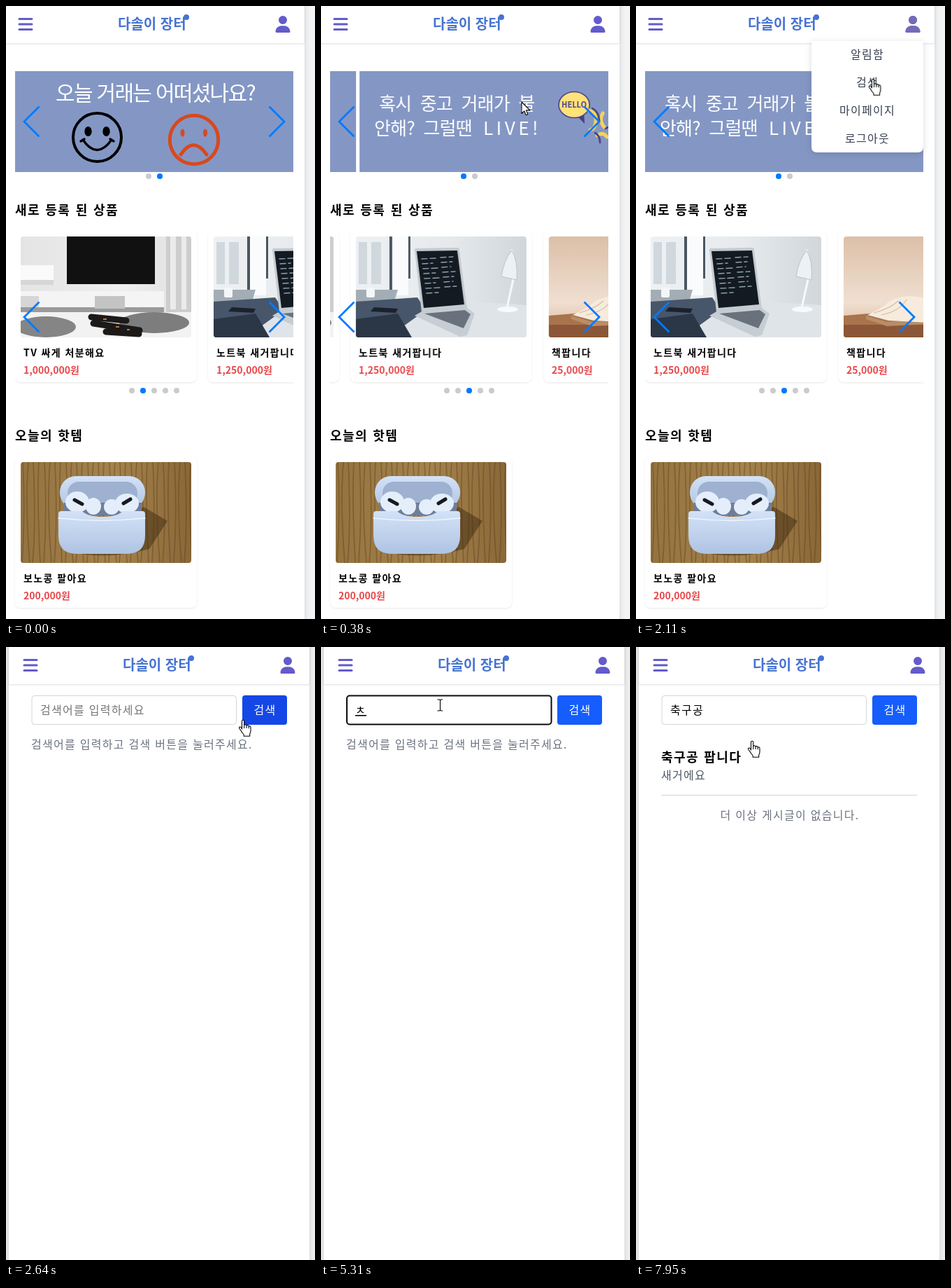
An HTML page for the animation above (8000 ms loop, 442 px wide and 875 px high).

```html
<!DOCTYPE html>
<html lang="ko">
<head>
<meta charset="utf-8">
<title>중고 장터</title>
<style>
html, body { margin: 0; height: 100%; overflow: hidden; background: #f2f3f5; }
body > svg { display: block; width: 100%; height: 100%; }
text { font: 400 16px "Noto Sans CJK KR", "Noto Sans CJK", "Noto Sans", sans-serif; letter-spacing: 1.28px; white-space: pre; }
.h { font-size: 18px; font-weight: 700; letter-spacing: 1.4px; word-spacing: 1px; }
.title { font-size: 14px; font-weight: 700; letter-spacing: 1.4px; }
.price { font-size: 14px; font-weight: 700; letter-spacing: 0; fill: #e8474a; }
.name { font-size: 20px; font-weight: 900; letter-spacing: 0; fill: #4673d2; }
.ask { font-size: 30px; letter-spacing: -1.7px; fill: #fff; }
.hand { font-size: 26px; font-weight: 500; letter-spacing: -.8px; word-spacing: 6px; fill: #fff; }
.mid { text-anchor: middle; }
.hello { font-size: 11px; font-weight: 700; letter-spacing: 0; fill: #4b3f87; }
.grey { fill: #6b7280; }
.ph { fill: #757575; }
.u { text-decoration: underline; text-underline-offset: 3px; }
.page { fill: #fff; filter: drop-shadow(0 0 4px rgba(0,0,0,.14)); }
.bar { fill: #fff; filter: drop-shadow(0 1px 1px rgba(0,0,0,.13)); }
.card { fill: #fff; filter: drop-shadow(0 1px 1px rgba(0,0,0,.09)); }
.drop { fill: #fff; filter: drop-shadow(0 2px 5px rgba(0,0,0,.15)); }
.photo { clip-path: url(#photo); }
.line { fill: none; stroke-linecap: round; stroke-linejoin: round; }
.nav { stroke: #007aff; stroke-width: 2.8; stroke-linecap: butt; stroke-linejoin: miter; }
.ptr { fill: #fff; stroke: #000; stroke-width: 1.1; stroke-linejoin: round; }

/* 1% of the loop = 80ms */
.a { animation: 8s step-end infinite; }
.home { animation-name: home; }
.search { animation-name: search; }
.slide { animation-name: slide; }
.dot { animation-name: dot; }
.menu { animation-name: menu; }
.tap1 { animation-name: tap1; }
.tap2 { animation-name: tap2; }
.btn { animation-name: btn; }
.box { animation-name: box; }
.hint { animation-name: hint; }
.found { animation-name: found; }
.reel { animation-name: reel; }
.arrow { animation-name: arrow; }
.finger { animation-name: finger; }
.beam { animation-name: beam; }
.move { animation: move 8s linear infinite; }

@keyframes home { 0% { opacity: 1 } 32.9%, 100% { opacity: 0 } }
@keyframes search { 0% { opacity: 0 } 32.9%, 100% { opacity: 1 } }
@keyframes slide {
  0% { transform: translateX(var(--w)) }
  2.7% { transform: translateX(calc(var(--w) * .93)) }
  3.7% { transform: translateX(calc(var(--w) * .4)) }
  4.65% { transform: translateX(calc(var(--w) * .1045)) }
  5.62% { transform: translateX(calc(var(--w) * .02)) }
  6.6%, 100% { transform: none }
}
@keyframes dot { 0% { transform: translateX(var(--d)) } 2.7%, 100% { transform: none } }
@keyframes menu { 0% { opacity: 0 } 14.5%, 100% { opacity: 1 } }
@keyframes tap1 { 0% { opacity: 0 } 12.6% { opacity: 1 } 14.5%, 100% { opacity: 0 } }
@keyframes tap2 { 0% { opacity: 0 } 31.1% { opacity: 1 } 32.9%, 100% { opacity: 0 } }
@keyframes btn { 0% { fill: #1447e6 } 38.5% { fill: #155dfc } 84.2% { fill: #1447e6 } 96.8%, 100% { fill: #155dfc } }
@keyframes box {
  0% { stroke: #d1d5db; stroke-width: 1px }
  43.6% { stroke: #0c0c0c; stroke-width: 2px }
  86.75%, 100% { stroke: #d1d5db; stroke-width: 1px }
}
@keyframes hint { 0% { opacity: 1 } 88.3%, 100% { opacity: 0 } }
@keyframes found { 0% { opacity: 0 } 88.3%, 100% { opacity: 1 } }
@keyframes reel {
  0% { transform: none }
  43.6% { transform: translateY(-30px) }
  47.1% { transform: translateY(-60px) }
  52.9% { transform: translateY(-30px) }
  53.87% { transform: translateY(-90px) }
  54.75% { transform: translateY(-120px) }
  60.6% { transform: translateY(-90px) }
  62.1% { transform: translateY(-60px) }
  63.5% { transform: translateY(-30px) }
  64.9% { transform: translateY(-150px) }
  66.4% { transform: translateY(-180px) }
  68.9% { transform: translateY(-210px) }
  70% { transform: translateY(-240px) }
  71.1% { transform: translateY(-270px) }
  72.2% { transform: translateY(-300px) }
  74.7% { transform: translateY(-330px) }
  86.75%, 100% { transform: translateY(-360px) }
}
@keyframes arrow { 0% { opacity: 0 } 1.75% { opacity: 1 } 10.6% { opacity: 0 } 38.5% { opacity: 1 } 43.4% { opacity: 0 } 82% { opacity: 1 } 84.2%, 100% { opacity: 0 } }
@keyframes finger { 0% { opacity: 0 } 10.6% { opacity: 1 } 38.5% { opacity: 0 } 84.2%, 100% { opacity: 1 } }
@keyframes beam { 0% { opacity: 0 } 43.4% { opacity: 1 } 82%, 100% { opacity: 0 } }
@keyframes move {
  0%, 1.75% { transform: translate(240px, 862px) }
  4.6%, 5.6% { transform: translate(287px, 137px) }
  11.6%, 19.4% { transform: translate(396px, 27px) }
  23% { transform: translate(350px, 78px) }
  25% { transform: translate(318px, 100px) }
  26.4%, 35% { transform: translate(339px, 104px) }
  39.5%, 42% { transform: translate(373px, 128px) }
  44.6%, 80.6% { transform: translate(170px, 83px) }
  83.1%, 84.1% { transform: translate(337px, 91px) }
  86%, 95.9% { transform: translate(362px, 92px) }
  99.1%, 100% { transform: translate(166px, 134px) }
}
</style>
</head>
<body>
<svg viewBox="0 0 442 875" preserveAspectRatio="xMinYMin meet">
<defs>
  <clipPath id="photo"><rect width="244" height="144" rx="4"/></clipPath>
  <linearGradient id="wall"><stop stop-color="#e4e4e4"/><stop offset=".6" stop-color="#efefef"/><stop offset="1" stop-color="#dedede"/></linearGradient>
  <linearGradient id="room"><stop stop-color="#eef1f3"/><stop offset=".55" stop-color="#e6eaed"/><stop offset="1" stop-color="#d0d6da"/></linearGradient>
  <linearGradient id="warm" x2="0" y2="1"><stop stop-color="#dcbfa8"/><stop offset=".65" stop-color="#f0dfd1"/><stop offset="1" stop-color="#d9b495"/></linearGradient>
  <linearGradient id="wood"><stop stop-color="#94733f"/><stop offset=".55" stop-color="#a5834d"/><stop offset="1" stop-color="#8a6737"/></linearGradient>
  <linearGradient id="shell" x2="0" y2="1"><stop stop-color="#d3e2f7"/><stop offset="1" stop-color="#aec3e3"/></linearGradient>
  <pattern id="grain" width="31" height="144" patternUnits="userSpaceOnUse">
    <path d="M3 0Q7 70 2 144M11 0Q6 60 13 144M18 0Q22 90 17 144M26 0Q23 50 28 144" class="line" stroke="#5a3d18" stroke-opacity=".4" stroke-width="1.8"/>
  </pattern>
  <path id="person" d="M396 14a6 6 0 1 1 0 12 6 6 0 1 1 0-12zM393.9 28.2h4.2c4.6 0 8.4 3.8 8.4 8.4q0 1.4-1.4 1.4h-18.2q-1.4 0-1.4-1.4c0-4.6 3.8-8.4 8.4-8.4z"/>
  <g id="head">
    <path d="M19 18.5h18M19 26h18M19 33.5h18" class="line" stroke="#635bcb" stroke-width="3"/>
    <text x="160" y="33" class="name">다솔이 장터</text>
    <circle cx="258" cy="16" r="4" fill="#4673d2"/>
    <use href="#person" fill="#635bcb"/>
  </g>
  <rect id="card" y="6" width="260" height="216" rx="8" class="card"/>
  <path id="prev" d="M47.5-21.5L26 0 47.5 21.5" class="line nav"/>
  <path id="next" d="M376.5-21.5L398 0 376.5 21.5" class="line nav"/>
  <text id="ask" class="ph" x="5">검색어를 입력하세요</text>
</defs>

<rect width="442" height="875" fill="#f2f3f5"/>

<g class="a home">
  <rect x="-10" y="-10" width="437" height="900" class="page"/>
  <rect x="-4" width="431" height="53" class="bar"/>
  <use href="#head"/>

  <svg x="13" y="93" width="398" height="144">
    <g class="a slide" style="--w:403px">
      <g transform="translate(-403)">
        <rect width="398" height="144" fill="#8497c4"/>
        <text x="58" y="42" class="ask">오늘 거래는 어떠셨나요?</text>
        <g class="line" stroke="#000" stroke-width="4">
          <circle cx="117.5" cy="94.5" r="34.5"/>
          <path d="M97 98Q117 127 138 98M94 100l5-3M136 97l5 3" stroke-width="3.4"/>
        </g>
        <ellipse cx="104.5" cy="86" rx="5.2" ry="7"/><ellipse cx="130.5" cy="86" rx="5.2" ry="7"/>
        <g class="line" stroke="#d8481f" stroke-width="5">
          <circle cx="256" cy="98" r="34.7"/>
          <path d="M237 119Q255 92 274 119"/>
        </g>
        <g fill="#d8481f"><ellipse cx="239.5" cy="88" rx="3" ry="5.5"/><ellipse cx="272" cy="88" rx="3" ry="5.5"/></g>
      </g>
      <rect width="398" height="144" fill="#8497c4"/>
      <text x="28" y="56" class="hand">혹시 중고 거래가 불</text>
      <text x="21" y="91" class="hand">안해? 그럴땐</text>
      <text x="177" y="91" class="hand" style="letter-spacing:4.5px">LIVE!</text>
      <path d="M312 65l10 10-1-14z" fill="#4b3f87"/>
      <ellipse cx="307" cy="48" rx="22" ry="18.5" fill="#ffe27a" stroke="#4b3f87" stroke-width="1.6"/>
      <text x="307" y="52" class="hello mid">HELLO</text>
      <g class="line" stroke-width="5" transform="translate(0 6)">
        <path d="M328 50q10 2 10 14t-8 14M348 54q-6 10 2 20M340 86q8-6 14 2" stroke="#f5d35c"/>
        <path d="M333 47q10 6 10 18M337 82q7 4 7 14M352 76q5-4 10 0" stroke="#4b3f87" stroke-width="2.6"/>
      </g>
    </g>
  </svg>
  <use href="#prev" y="165"/><use href="#next" y="165"/>
  <g fill="#cbcbcb"><circle cx="204" cy="243" r="4"/><circle cx="220" cy="243" r="4"/></g>
  <circle cx="204" cy="243" r="4" fill="#007aff" class="a dot" style="--d:16px"/>

  <text x="13" y="298" class="h">새로 등록 된 상품</text>
  <svg x="13" y="315" width="398" height="230">
    <g class="a slide" style="--w:276px">
      <g transform="translate(-276)">
        <use href="#card"/>
        <g transform="translate(8 14)"><g class="photo">
          <rect width="244" height="144" fill="url(#wall)"/>
          <path d="M208 0h36v110h-36z" fill="#cdcdcd"/><path d="M214 0h8v104h-8zM230 0h7v104h-7z" fill="#ebebeb"/>
          <path d="M66 0h126v68H66z" fill="#111"/>
          <path d="M0 41h47v28H0z" fill="#fafafa"/><path d="M0 62h47v7H0z" fill="#d6d6d6"/>
          <path d="M0 78h205v32H0z" fill="#f4f4f4"/><path d="M0 101h205v8H0z" fill="#9a9a9a"/>
          <path d="M106 85h43v18h-43z" fill="#c4c4c4"/><path d="M0 85h26v16H0z" fill="#d6d6d6"/>
          <path d="M0 108h244v36H0z" fill="#f2f2f2"/>
          <ellipse cx="36" cy="129" rx="43" ry="15" fill="#858585"/><ellipse cx="191" cy="123" rx="50" ry="15" fill="#7d7d7d"/>
          <g class="line" stroke="#1c1918" stroke-width="9"><path d="M101 115l50 5M104 124l66 10M122 136l47 3"/></g>
          <path d="M118 118h5M136 129h5M152 133h4" stroke="#c0763a" stroke-width="2"/>
        </g></g>
        <text x="12" y="185" class="title">TV 싸게 처분해요</text>
        <text x="12" y="210" class="price">1,000,000원</text>
      </g>
      <g>
        <use href="#card"/>
        <g transform="translate(8 14)"><g class="photo">
          <rect width="244" height="144" fill="url(#room)"/>
          <path d="M4 8h12v60H4zM22 8h14v60H22z" fill="#d0d8dd"/>
          <path d="M48 0h4v88h-4zM75 0h3v60h-3z" fill="#4b5660"/><path d="M52 0h23v84H52z" fill="#fafbfc"/>
          <path d="M0 76h60l-6 20H0z" fill="#a3adb5"/>
          <path d="M0 94l92-6 152 10v46H0z" fill="#dfe4e8"/>
          <path d="M0 93l88-6 12 18-54 39H0z" fill="#47566a"/><path d="M0 118l60-8 20 34H0z" fill="#2b3646"/>
          <rect x="15" y="73" width="12" height="14" rx="2" fill="#f4f6f7"/>
          <path d="M26 101l34 2-3 6-36-2z" fill="#1b222c"/>
          <path d="M84 113l12-7 63-4 11 8-11 31-10 2z" fill="#c6cdd3"/><path d="M98 110l58-5 8 6-10 20z" fill="#69727c"/>
          <path d="M84 19q0-2 2-2l59-1q3 0 3 3l11 84-65 5z" fill="#c4cbd1"/>
          <path d="M87 21l58-1 10 77-58 5z" fill="#141a22"/>
          <g class="line" stroke="#8fa3ad" stroke-width="1.4" stroke-dasharray="8 4 14 6 5 3">
            <path d="M94 32l20-1M95 39l15-1M96 46l21-1M97 53l17-1M98 60l21-1M99 67l15-1M100 74l20-1M101 81l17-1M121 30l18-1M122 37l16-1M123 44l13-1M124 51l18-1M125 58l15-1M126 65l13-1M127 72l17-1"/>
          </g>
          <path d="M223 20l5 28-12 54" class="line" stroke="#f7f9fa" stroke-width="3"/>
          <path d="M208 57q4-24 15-37 9 14 7 42z" fill="#eef1f3" stroke="#bac3ca"/>
          <ellipse cx="217" cy="104" rx="15" ry="4" fill="#f7f9fa"/>
        </g></g>
        <text x="12" y="185" class="title">노트북 새거팝니다</text>
        <text x="12" y="210" class="price">1,250,000원</text>
      </g>
      <g transform="translate(276)">
        <use href="#card"/>
        <g transform="translate(8 14)"><g class="photo">
          <rect width="244" height="144" fill="url(#warm)"/>
          <path d="M0 113l60-5h184v36H0z" fill="#a9734c"/><path d="M0 126h244v18H0z" fill="#8b5738"/>
          <path d="M32 113l30 9 60-3v6l-60 3-30-10z" fill="#b98d68"/>
          <path d="M34 112q20-9 34-21 28-12 54 0 26-12 54 0l32 22-86 10-58-3z" fill="#f6ebdc"/>
          <path d="M44 109q22-6 34-17M54 112q26-5 36-22M122 91v30" class="line" stroke="#d5bca0" stroke-width="1.2"/>
        </g></g>
        <text x="12" y="185" class="title">책팝니다</text>
        <text x="12" y="210" class="price">25,000원</text>
      </g>
    </g>
  </svg>
  <use href="#prev" y="444"/><use href="#next" y="444"/>
  <path d="M180 549h65" class="line" stroke="#cbcbcb" stroke-width="8" stroke-dasharray="0 16"/>
  <circle cx="212" cy="549" r="4" fill="#007aff" class="a dot" style="--d:-16px"/>

  <text x="13" y="620" class="h">오늘의 핫템</text>
  <g transform="translate(13 637)">
    <use href="#card"/>
    <g transform="translate(8 14)"><g class="photo">
      <rect width="244" height="144" fill="url(#wood)"/><rect width="244" height="144" fill="url(#grain)"/>
      <path d="M62 126q58 16 122-2l26-40-34-20z" fill="#3f2b11" opacity=".5"/>
      <rect x="56" y="20" width="122" height="47" rx="23" fill="url(#shell)"/>
      <rect x="67" y="28" width="100" height="34" rx="16" fill="#9fb1d0"/>
      <path d="M62 58h111v18H62z" fill="#6f7d98"/>
      <g fill="#e4eefb"><ellipse cx="81" cy="57" rx="17" ry="15"/><ellipse cx="152" cy="59" rx="17" ry="14"/><ellipse cx="104" cy="63" rx="11" ry="12"/><ellipse cx="130" cy="64" rx="11" ry="11"/></g>
      <g class="line" stroke="#17191f" stroke-width="5"><path d="M77 54l11 6M157 53l-10 6"/></g>
      <path d="M54 74q0-4 4-4h30q8 8 29 8t29-8h28q4 0 4 4v31q0 26-26 26H80q-26 0-26-26z" fill="url(#shell)"/>
      <path d="M54 80q62 7 124 0" class="line" stroke="#eef5ff" stroke-width="1.5"/>
    </g></g>
    <text x="12" y="185" class="title">보노콩 팔아요</text>
    <text x="12" y="210" class="price">200,000원</text>
  </g>

  <g class="a menu">
    <path d="M251 50h160v151q0 8-8 8H259q-8 0-8-8z" class="drop"/>
    <use href="#person" fill="#746ab8"/>
    <g class="mid" fill="#374151">
      <text x="331" y="75">알림함</text>
      <text x="331" y="115">검색</text>
      <text x="331" y="155">마이페이지</text>
      <text x="331" y="195">로그아웃</text>
    </g>
  </g>
  <circle cx="396" cy="27" r="12" fill="#e6e678" fill-opacity=".2" class="a tap1"/>
  <circle cx="339" cy="104" r="12" fill="#e6e678" fill-opacity=".2" class="a tap2"/>
</g>

<g class="a search">
  <rect width="442" height="875" fill="#efeff1"/>
  <rect x="4" y="-10" width="430" height="900" class="page"/>
  <rect x="4" width="430" height="53" class="bar"/>
  <use href="#head" x="7"/>

  <rect x="37" y="69.5" width="292.5" height="41" rx="4" fill="#fff" class="a box"/>
  <svg x="44" y="75" width="280" height="30">
    <g class="a reel">
      <use href="#ask" y="21"/>
      <use href="#ask" y="51"/><path d="M5.5 35v21" stroke="#000"/>
      <text x="5" y="81">c</text>
      <text x="5" y="111">cn</text>
      <text x="5" y="141">cnr</text>
      <text x="5" y="171" class="u">ㅊ</text>
      <text x="5" y="201" class="u">추</text>
      <text x="5" y="231" class="u">축</text>
      <text x="5" y="261">축<tspan class="u">ㄱ</tspan></text>
      <text x="5" y="291">축<tspan class="u">구</tspan></text>
      <text x="5" y="321">축구<tspan class="u">고</tspan></text>
      <text x="5" y="351">축구<tspan class="u">공</tspan></text>
      <text x="5" y="381">축구공</text>
    </g>
  </svg>
  <rect x="338" y="69" width="64" height="42" rx="4" class="a btn"/>
  <text x="370.5" y="96" class="mid" fill="#fff">검색</text>

  <text x="36" y="145" class="grey a hint">검색어를 입력하고 검색 버튼을 눌러주세요.</text>
  <g class="a found">
    <text x="36" y="164" class="h">축구공 팝니다</text>
    <text x="36" y="189" fill="#4b5563">새거에요</text>
    <path d="M36 211.5h366" stroke="#d1d1d1"/>
    <text x="220" y="246" class="mid grey">더 이상 게시글이 없습니다.</text>
  </g>
</g>

<g class="move">
  <path d="M0 0V16.5L3.8 12.9 6.3 18.7 8.9 17.6 6.4 11.9H11.8Z" class="ptr a arrow"/>
  <path d="M-1.5 13V1.8a1.6 1.6 0 0 1 3.2 0V8q.3-1.3 1.7-1.2 1.4.1 1.6 1.6.4-.9 1.6-.8 1.5.2 1.6 1.6.4-.6 1.3-.5 1.5.3 1.5 2v5q0 2.5-1.3 4.3V23.3H1.2V21Q-1.5 18-3 15.2-5.6 12.5-5.5 11.4-5.3 9.8-3.8 10q1 .2 2.3 3zM1.7 8v4M5 8.5v3.5M8.2 9.2v3" class="ptr a finger"/>
  <path d="M-3.5-8h2.5q1 0 1.5 1 .5-1 1.5-1H4M.5-7V7M-3.5 8h2.5q1 0 1.5-1 .5 1 1.5 1H4" fill="none" stroke="#000" stroke-width="1.1" class="a beam"/>
</g>
</svg>
</body>
</html>
```
